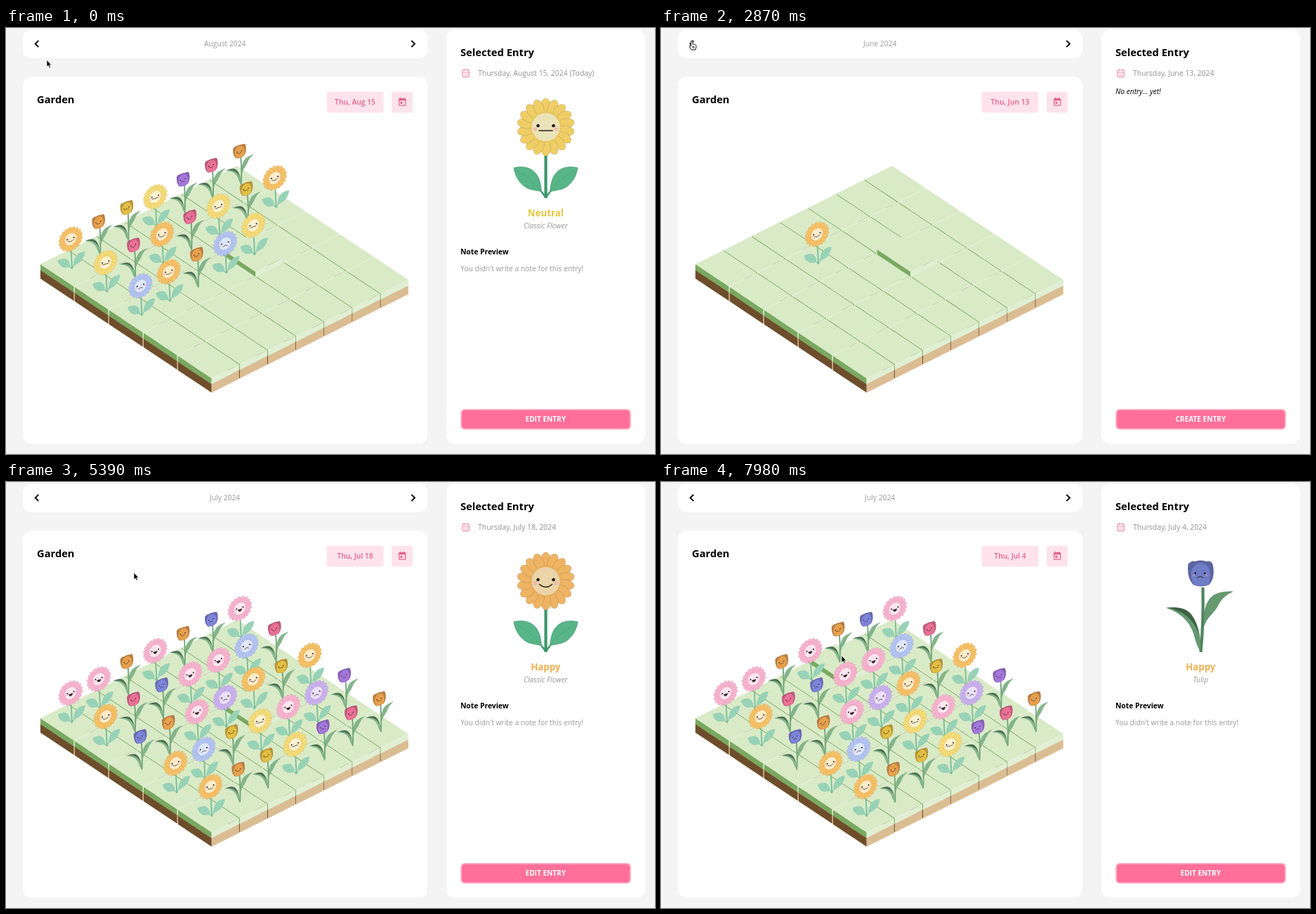
An HTML page that plays this animation: 924x606 px, repeating every 8 s.

```html
<!DOCTYPE html>
<html lang="en">
<head>
<meta charset="utf-8">
<title>Flower garden</title>
<style>
html, body { margin: 0; width: 100%; height: 100%; overflow: hidden; background: #f4f4f4; }
svg { display: block; }
text { font: 400 10.3px "Open Sans", "Noto Sans", sans-serif; fill: #999; }
.mid { text-anchor: middle; }
.title { font-size: 14.7px; font-weight: 700; fill: #000; }
.label { font-weight: 700; fill: #000; }
.date { font-size: 10.45px; font-weight: 500; fill: #929292; }
.pink { font-weight: 600; fill: #e4618f; }
.mood { font-size: 13.25px; font-weight: 700; }
.it { font-style: italic; }
.none { font-weight: 500; fill: #000; }
.white { font-size: 10.1px; font-weight: 700; fill: #fff; }
</style>
</head>
<body>
<svg width="924" height="606" viewBox="0 0 924 606">
  <g fill="#fff">
    <rect x="24" y="2.5" width="576" height="40.5" rx="12"/>
    <rect x="24" y="69.5" width="576" height="522" rx="12"/>
    <rect x="627" y="2.5" width="283" height="589" rx="12"/>
  </g>
  <circle id="ripple" cy="20" r="21" fill="#000" opacity=".05"/>
  <path d="M46.3 18L41.6 22.5 46.3 27M577.3 18L582 22.5 577.3 27" fill="none" stroke="#000" stroke-width="1.8"/>
  <text id="month" class="mid" x="311.7" y="26.4"></text>
  <text class="title" x="44" y="107">Garden</text>
  <g fill="#ffe3ec">
    <rect x="456.5" y="90.5" width="81" height="30" rx="4"/>
    <rect x="549" y="90.5" width="30" height="30" rx="4"/>
  </g>
  <text id="short" class="pink mid" x="497" y="109.2"></text>
  <g fill="none" stroke="#e4618f" stroke-width="1.2">
    <rect x="559.6" y="100.6" width="9.2" height="9.6" rx="1"/>
    <path d="M559.6 102H568.8" stroke-width="2.6"/>
    <path d="M561.7 98.8V101M566.7 98.8V101"/>
    <path d="M561.4 106.4H564.4" stroke-width="3"/>
  </g>
  <g id="tiles"></g>
  <g id="beds"></g>
  <text class="title" x="647" y="40">Selected Entry</text>
  <g fill="none" stroke="#f08fb1" stroke-width="1.1">
    <rect x="649.8" y="59.8" width="9.6" height="9.8" rx="1.2"/>
    <path d="M649.8 63H659.4M652.2 58V61M657 58V61"/>
    <path d="M651.6 65.4H658M651.6 67.6H658" stroke-dasharray="1.3 1.2"/>
  </g>
  <text id="long" class="date" x="672" y="68"></text>
  <g id="entry">
    <g id="plants" transform="translate(768.5 242)"></g>
    <text id="mood" class="mood mid" x="768.3" y="268.4"></text>
    <text id="kind" class="it mid" x="768.3" y="285"></text>
    <text class="label" x="647" y="322">Note Preview</text>
    <text x="647" y="345.6">You didn't write a note for this entry!</text>
  </g>
  <text id="empty" class="it none" x="647" y="94.4">No entry... yet!</text>
  <rect x="648.3" y="543" width="240.4" height="27.2" rx="5" fill="#ff6f9a" stroke="#ffa3bf" stroke-width="2"/>
  <text id="action" class="white mid" x="768.3" y="559.8"></text>
  <g id="pointer">
    <path id="arrow" d="M0 0V9.7L2.2 7.8 3.8 11.2 5.4 10.5 3.9 7.2H6.9Z" stroke="#fff" stroke-width=".7"/>
    <path id="hand" d="M-1.3 .8Q0 -.8 1 .8L1.2 5Q2.5 4.4 3 5.4Q4.3 5 4.7 6Q6.2 5.8 6.2 7.4L5.8 10.4 5 13H-.8L-3.6 8.4Q-4.2 7 -2.6 7L-1.3 8.2ZM1.2 8V10.6M3 8V10.6" fill="#fff" stroke="#111" stroke-width="1" stroke-linejoin="round"/>
  </g>
</svg>
<script>
const $ = id => document.getElementById(id);
const LOOP = 8000, COLS = 7, ROWS = 5, LIFT = 6;

// isometric grid: columns are weekdays, rows are weeks
const iso = (a, b) => [49 + 40.15 * a + 49 * b, 336 - 20.07 * a + 32.6 * b];
const root = (c, r) => [94 + 40.15 * c + 49.75 * r, 342.8 - 20.05 * c + 33.25 * r];
const order = [];
for (let r = 0; r < ROWS; r++) for (let c = COLS - 1; c >= 0; c--) order.push([c, r]);

function wall(p, q, top, h, fill) {
  return `<path fill="${fill}" d="M${p[0]} ${p[1] + top}L${q[0]} ${q[1] + top}v${h}L${p[0]} ${p[1] + top + h}Z"/>`;
}
function tile(c, r) {
  const c2 = c + .974, r2 = r + .975;
  const back = iso(c, r), front = iso(c, r2), right = iso(c2, r2), far = iso(c2, r);
  return `<g id="t${r * COLS + c}">` +
    wall(back, front, 0, 8.8, '#79a960') + wall(back, front, 8.5, 12, '#6e4d2b') +
    wall(front, right, 0, 8.5, '#e0efd3') + wall(front, right, 8.2, 12.3, '#dbbd93') +
    `<path fill="#d9eac7" d="M${back}L${front}L${right}L${far}Z"/></g>`;
}

const MOUTH = {
  happy: 'M-9 4.5Q0 12.5 9 4.5', neutral: 'M-9.5 5H9.5', sad: 'M-7 9Q0 2 7 9', glad: 'M-5.5 3H6.5Q5 10 0 9.5Q-5 9 -5.5 3Z'
};
function face(mood) {
  return `<g fill="#f29aa8" opacity=".5"><circle cx="-15" cy="3" r="2.8"/><circle cx="15" cy="3" r="2.8"/></g>` +
    `<g fill="#1c1714"><circle cx="-11" cy="-2" r="2.3"/><circle cx="11" cy="-2" r="2.3"/></g>` +
    `<path d="${MOUTH[mood]}" fill="${mood == 'glad' ? '#3a2024' : 'none'}" stroke="#2a211c" stroke-width="1.6" stroke-linecap="round"/>`;
}
function sunflower(petal, disc, mood, leaf, stem) {
  const blade = side => `<g transform="scale(${side} 1)">
    <path d="M6 -9L0 -1" stroke-width="2.5"/>
    <path d="M6 -9C14 -12 24 -11 32 -18C40 -25 44 -34 45.5 -43C34 -46 22 -44 15 -36C8 -28 7 -18 6 -9Z"/>
    <path d="M41 -39Q20 -28 7 -10" fill="none" opacity=".5"/></g>`;
  let s = `<path d="M0 -70V0" stroke="${stem}" stroke-width="4.2"/>
    <g fill="${leaf}" stroke="${stem}" stroke-width=".8">${blade(-1)}${blade(1)}</g>
    <g transform="translate(0 -101)"><g fill="${petal}" stroke="#7a4a30" stroke-opacity=".2" stroke-width="1">`;
  for (let i = 0; i < 18; i++) s += `<ellipse cy="-29" rx="7" ry="12" transform="rotate(${i * 20})"/>`;
  return s + `</g><circle r="22.5" fill="${petal}"/><circle r="22.5" fill="#a56a20" opacity=".08"/>
    <circle r="20" fill="${disc}"/>${face(mood)}</g>`;
}
function tulip(cup, mood, leaf, stem, k) {
  return `<path d="M3 -92Q4 -40 0 0" fill="none" stroke="${stem}" stroke-width="4.2"/>
    <g fill="${leaf}" stroke="${stem}" stroke-width=".8">
    <path d="M0 0C-3 -6 -6 -12 -8 -20C-13 -42 -28 -56 -48 -63C-36 -64 -24 -63 -16 -56C-6 -46 0 -26 0 0Z"/>
    <path d="M4 -36C3 -56 8 -72 16 -79C24 -85 34 -86 45 -86C34 -81 28 -74 24 -66C18 -54 8 -50 4 -36Z"/></g>
    <path d="M-46 -63C-32 -65 -22 -62 -16 -56C-9 -48 -5 -38 -3 -26C-10 -46 -24 -58 -46 -63Z" fill="#16281c" opacity=".5"/>
    <g transform="translate(0 -112) scale(${k})">
    <path d="M-18 -13Q-13 -19 -8 -17Q0 -20 8 -17Q14 -19 17 -13Q21 6 12 16Q0 21 -11 16Q-20 6 -18 -13Z" fill="${cup}"/>
    <path d="M-18 -13Q-13 -19 -8 -17Q0 -20 8 -17Q14 -19 17 -13Q21 6 12 16Q0 21 -11 16Q-20 6 -18 -13Z" fill="#2a1830" opacity=".25"/>
    <path d="M-10 16Q-19 -2 -8 -12Q0 -18 8 -12Q18 -2 11 16Q0 20 -10 16Z" fill="${cup}"/>
    <g transform="translate(-1 1) scale(.6)">${face(mood)}</g></g>`;
}

const SUN = {
  O: ['#f6c167', '#fceccb', 'happy'], Y: ['#f5dc78', '#faf2d0', 'neutral'], P: ['#f7b3d0', '#fce6f0', 'glad'],
  B: ['#b2c4f4', '#dfe7fb', 'sad'], V: ['#c9b1f0', '#eae1fa', 'sad']
};
const TULIP = {
  o: ['#e6a04c', 'happy'], y: ['#e2be42', 'neutral'], p: ['#ea7096', 'happy'], b: ['#7c85da', 'sad'], v: ['#a377dc', 'sad']
};
const MONTHS = {
  August: 'OoyYvpo' + 'YpOpYyO' + 'BOoBY',
  July: 'PPoPobP' + 'OpbPPBp' + 'boPVOyO' + 'OByYPVv' + 'OoyYvpo',
  June: '.........O'
};
function bed(name) {
  const plants = order.map(([c, r]) => {
    const i = r * COLS + c, k = MONTHS[name][i];
    if (!k || k == '.') return '';
    const [x, y] = root(c, r);
    const art = SUN[k] ? sunflower(...SUN[k], '#98d3b8', '#72bd9b') : tulip(...TULIP[k], '#84b48a', '#6aa376', 1.2);
    return `<g id="${name}${i}"><g transform="translate(${x} ${y}) matrix(.42 -.14 .02 .42 0 0)">${art}</g></g>`;
  });
  return `<g id="${name}">${plants.join('')}</g>`;
}
$('tiles').innerHTML = order.map(p => tile(...p)).join('');
$('beds').innerHTML = Object.keys(MONTHS).map(bed).join('');

const GREEN = ['#58b588', '#3b976a'];
const ART = {
  neutral: sunflower('#efce66', '#ebe3b8', 'neutral', ...GREEN),
  happy: sunflower('#eeb464', '#ead4a8', 'happy', ...GREEN),
  tulip: tulip('#6f7cc6', 'sad', '#659a70', '#4f8560', 1)
};
$('plants').innerHTML = Object.keys(ART).map(k => `<g id="art-${k}">${ART[k]}</g>`).join('');

const TINT = { Neutral: '#e5c642', Happy: '#efb155', Sad: '#a6d3f6' };
const heads = [[0, 'August'], [1610, 'July'], [2800, 'June'], [4830, 'July']];
// time, month, tile, long date, short date, mood, kind
const jul18 = ['July', 18, 'Thursday, July 18, 2024', 'Thu, Jul 18', 'Happy', 'Classic Flower'];
const picks = [
  [0, 'August', 18, 'Thursday, August 15, 2024 (Today)', 'Thu, Aug 15', 'Neutral', 'Classic Flower'],
  [1680, ...jul18],
  [2870, 'June', 18, 'Thursday, June 13, 2024', 'Thu, Jun 13'],
  [4900, ...jul18],
  [6230, 'July', 9, 'Tuesday, July 9, 2024', 'Tue, Jul 9', 'Sad', 'Tulip'],
  [7910, 'July', 4, 'Thursday, July 4, 2024', 'Thu, Jul 4', 'Happy', 'Tulip']
];
// the large picture loads a little later than its text
const arts = [[0, 'neutral'], [1750, 'happy'], [2870, ''], [4970, 'happy'], [6440, 'tulip']];
const clicks = [[1330, 44], [2520, 44], [4550, 579]];
const path = [
  [0, 58, 45.5], [70, 58, 45.5], [630, 40, 19], [1050, 40, 19], [1190, 44, 18], [3430, 44, 18],
  [3920, 330, 30], [4060, 335, 30], [4410, 576, 19], [4690, 576, 19], [5390, 182, 129],
  [6090, 219, 321], [6930, 219, 321], [7700, 256, 249], [7840, 257, 247], [LOOP, 257, 247]
];

const lastIndex = (rows, t) => rows.findLastIndex(r => r[0] <= t);
const show = (id, on) => { $(id).style.display = on ? '' : 'none'; };
const write = (id, s) => { if ($(id).textContent != s) $(id).textContent = s; };

function pointerAt(t) {
  const i = Math.min(lastIndex(path, t), path.length - 2);
  const [t0, x0, y0] = path[i], [t1, x1, y1] = path[i + 1];
  const p = (t - t0) / (t1 - t0), e = p * p * (3 - 2 * p);
  return [x0 + (x1 - x0) * e, y0 + (y1 - y0) * e];
}

function draw(t) {
  const n = lastIndex(picks, t);
  const [t0, month, cell, long, short, mood, kind] = picks[n];
  write('month', heads[lastIndex(heads, t)][1] + ' 2024');
  write('long', long);
  write('short', short);
  write('action', mood ? 'EDIT ENTRY' : 'CREATE ENTRY');
  show('entry', mood);
  show('empty', !mood);
  if (mood) {
    write('mood', mood);
    write('kind', kind);
    $('mood').style.fill = TINT[mood];
  }
  const art = arts[lastIndex(arts, t)][1];
  for (const k in ART) show('art-' + k, k == art);
  for (const m in MONTHS) show(m, m == month);

  const old = n ? picks[n - 1][2] : cell;
  const rise = Math.min(1, (t - t0 + 35) / 105);
  for (let i = 0; i < COLS * ROWS; i++) {
    const up = i == cell ? (old == cell ? 1 : rise) : i == old ? 1 - rise : 0;
    const move = `translate(0 ${-LIFT * up})`;
    $('t' + i).setAttribute('transform', move);
    $(month + i)?.setAttribute('transform', move);
  }

  const hit = clicks.find(c => t >= c[0] && t < c[0] + 70);
  show('ripple', hit);
  if (hit) $('ripple').setAttribute('cx', hit[1]);

  const [x, y] = pointerAt(t);
  const over = [44, 579].some(cx => Math.hypot(x - cx, y - 22) < 20);
  $('pointer').setAttribute('transform', `translate(${x} ${y})`);
  show('hand', over);
  show('arrow', !over);
}

const start = performance.now();
function tick() {
  draw((performance.now() - start) % LOOP);
  requestAnimationFrame(tick);
}
tick();
</script>
</body>
</html>
```
